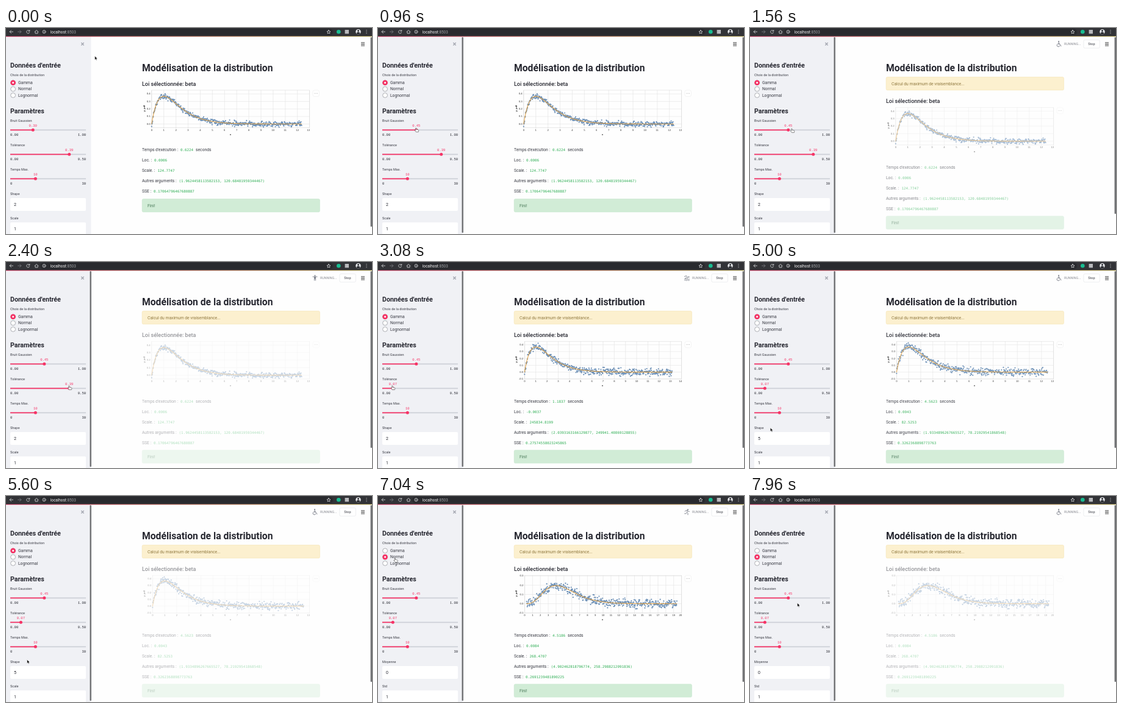
Write an HTML page that moves like this. It is 600x338 px and loops after 8 s.

```html
<!DOCTYPE html>
<html lang="fr">
<head>
<meta charset="utf-8">
<style>
html, body { margin: 0; width: 100%; height: 100%; overflow: hidden; background: #fff; }
svg { display: block; width: 100vw; height: 100vh; font-family: Roboto, Inter, sans-serif; fill: #262730; }
.mono { font-family: "Liberation Mono", "DejaVu Sans Mono", monospace; }
.code { font-family: "DejaVu Sans Mono", monospace; font-size: 5.83px; fill: #2fae55; }
.label { font-size: 5.5px; fill: #3a3c45; }
.body { font-size: 6.72px; fill: #363841; }
.h2 { font-size: 10.7px; font-weight: 700; }
.tick { font-size: 4.2px; font-family: "Liberation Sans", sans-serif; fill: #2b2b2b; }
.line { fill: none; stroke-linecap: round; stroke-linejoin: round; }
</style>
</head>
<body>
<svg viewBox="0 0 600 338" preserveAspectRatio="none">
  <defs>
    <linearGradient id="stripe"><stop stop-color="#f63366"/><stop offset="1" stop-color="#fbe87a"/></linearGradient>
  </defs>
  <rect width="600" height="338" fill="#fefefe"/>

  <g id="main">
    <text x="223" y="71.4" font-size="15.7" font-weight="700">Modélisation de la distribution</text>
    <g id="warning">
      <rect x="223.2" y="80.5" width="291.2" height="21.4" rx="2" fill="#fcf0cf" stroke="#f5e3b0" stroke-width=".6"/>
      <text x="232" y="93.6" font-size="6.75" fill="#8f783f">Calcul du maximum de vraisemblance...</text>
    </g>
    <g id="results">
      <text id="law" x="223" y="95.2" font-size="9" font-weight="500">Loi sélectionnée: beta</text>
      <g id="stale">
        <g id="charts"></g>
        <rect x="503" y="102" width="10.5" height="10.5" rx="3" fill="#fff" stroke="#ededed" stroke-width=".6"/>
        <path class="line" d="M506 107.3h0M508.2 107.3h0M510.4 107.3h0" stroke="#a5a5a5" stroke-width="1"/>
        <g id="lines"></g>
        <rect x="223.2" y="280.5" width="291.2" height="21.4" rx="2" fill="#d1ecd6" stroke="#c6e6cd" stroke-width=".6"/>
        <text x="232" y="293.6" font-size="6.7" fill="#4a7959">Fini!</text>
      </g>
    </g>
  </g>
  <rect id="scroll" x="597.6" y="15" width="2.4" rx="1" fill="#6f7073"/>

  <g id="status">
    <g id="poses" transform="translate(506.5 26)" stroke="#777b86" stroke-width=".9"></g>
    <text x="515" y="28" font-size="5.3" fill="#8b8d94">RUNNING...</text>
    <rect id="stopBox" x="547" y="19.5" width="26.3" height="13.5" rx="2" fill="#fff" stroke="#e6e7ea" stroke-width=".7"/>
    <text x="554.3" y="28.2" font-size="5.5" fill="#3a3c45">Stop</text>
  </g>
  <path d="M582 24h6M582 26.5h6M582 29h6" stroke="#333" stroke-width="1.1"/>

  <g id="sidebar">
    <rect y="14" width="139.5" height="324" fill="#f0f1f5"/>
    <path d="M123.3 24l4.4 4.4m0-4.4l-4.4 4.4" stroke="#a4a7b1" stroke-width="1.4"/>
    <text class="h2" x="7" y="65">Données d'entrée</text>
    <text class="label" x="7" y="79.2">Choix de la distribution</text>
    <g id="radios"></g>
    <text class="h2" x="7" y="139.5">Paramètres</text>
    <g id="sliders"></g>
    <g id="fields"></g>
    <rect id="sideScroll" x="137.5" y="15" width="2.4" height="321" rx="1" fill="#6f7073"/>
  </g>

  <g id="browser">
    <rect width="600" height="14" fill="#323337"/>
    <rect x="56" y="1" width="480" height="10.8" rx="5.4" fill="#292a2e"/>
    <g class="line" stroke="#c9cacc" stroke-width=".9">
      <path d="M11.5 6.2h-5.4m2.4-2.4L6.1 6.2l2.4 2.4"/>
      <path d="M19.5 6.2h5.4m-2.4-2.4l2.4 2.4-2.4 2.4" stroke="#77787c"/>
      <path d="M38.5 5a2.6 2.6 0 1 0 .1 2.4M38.8 3.4V5.2H37"/>
      <path d="M47 6.3L50 3.6l3 2.7M48 6v2.9h4V6"/>
      <circle cx="62.5" cy="6.2" r="2.6"/><path d="M62.5 6v1.4M62.5 4.8h0"/>
      <path d="M529 3.4l.9 1.9 2.1.3-1.5 1.4.4 2.1-1.9-1-1.9 1 .4-2.1-1.5-1.4 2.1-.3z"/>
      <path d="M591 3.7h0M591 6.2h0M591 8.7h0" stroke-width="1.2"/>
    </g>
    <text x="72.7" y="8.5" font-size="6.4" fill="#f1f1f2">localhost<tspan fill="#a0a2a6">:8503</tspan></text>
    <circle cx="545.3" cy="6.2" r="3.3" fill="#18bd91"/>
    <rect x="555.6" y="3" width="6.4" height="6.4" fill="#b9babd"/>
    <circle cx="577.5" cy="6.2" r="4.2" fill="#e6e7ea"/>
    <path d="M574.6 9.2q.4-2.8 2.9-2.8t2.9 2.8q-2.9 2.4-5.8 0z" fill="#2b2d33"/>
    <circle cx="577.5" cy="4.6" r="1.5" fill="#2b2d33"/>
    <rect y="13.6" width="600" height=".8" fill="url(#stripe)"/>
  </g>

  <g id="cursor">
    <path d="M0 0v6.2l1.5-1.3 1 2.2 1.1-.5-1-2.1h2z" fill="#111" stroke="#fff" stroke-width=".5"/>
    <path d="M-1.2-2.6q.7-.8 1.2 0v2l3 .6q1 .3.9 1.3l-.5 2.3H-.6L-2.6.9q0-1 1.4-.1z" fill="#fff" stroke="#444" stroke-width=".6"/>
    <path class="line" d="M-1.3-3.2h.8l.5.5.5-.5h.8M0-2.7v5.4M-1.3 3.2h.8l.5-.5.5.5h.8" stroke="#555" stroke-width=".5"/>
  </g>
</svg>
<script>
const LOOP = 8000, PINK = '#f63366', SHIFT = 28.2;
const $ = id => document.getElementById(id);
const clamp = v => Math.max(0, Math.min(1, v));
const ease = p => p * p * (3 - 2 * p);
const show = (el, on) => el.setAttribute('visibility', on ? 'inherit' : 'hidden');
const pick = (group, index) => [...group.children].forEach((el, i) => show(el, i === index));

// Piecewise eased path through [time, ...values] rows.
function track(rows, t) {
  const i = rows.findIndex(r => r[0] > t);
  if (i < 0) return rows.at(-1).slice(1);
  const a = rows[Math.max(0, i - 1)], b = rows[i];
  const p = ease(clamp((t - a[0]) / (b[0] - a[0] || 1)));
  return a.slice(1).map((v, k) => v + (b[k + 1] - v) * p);
}
const stepAt = (rows, t) => rows.filter(r => r[0] <= t).at(-1)[1];

function random(seed) {
  return () => {
    seed = (seed + 0x6D2B79F5) | 0;
    let z = Math.imul(seed ^ seed >>> 15, 1 | seed);
    z = z + Math.imul(z ^ z >>> 7, 61 | z) ^ z;
    return ((z ^ z >>> 14) >>> 0) / 4294967296;
  };
}

const fits = [
  { shape: 2, noise: .017, start: 0, end: 12.35, xMax: 13, yMin: -.05, yMax: .45, left: 238.8,
    values: ['0.6224', '0.0006', '124.7747', '(1.9624458113582153, 120.68481959344467)', '0.17064796467680887'] },
  { shape: 2, noise: .025, start: 0, end: 13.15, xMax: 14, yMin: -.1, yMax: .45, left: 240.3,
    values: ['1.1837', '-0.0037', '245834.8199', '(2.0393163166129877, 249941.40869128855)', '0.27574558023245865'] },
  { shape: 2, noise: .027, start: 0, end: 12.5, xMax: 13, yMin: -.1, yMax: .45, left: 240.3,
    values: ['4.5623', '0.0043', '82.5253', '(1.9334896267665527, 78.21929541868548)', '0.3262368898773763'] },
  { shape: 5, noise: .023, start: .25, end: 19.4, xMax: 20, yMin: -.1, yMax: .306, left: 240.5,
    values: ['4.5186', '0.0084', '268.4707', '(4.902462818796774, 258.2988212091836)', '0.2691239481890225'] }
];
const captions = ["Temps d'exécution :", 'Loc. :', 'Scale. :', 'Autres arguments :', 'SSE :'];

function chart(fit, index) {
  const top = 102, height = 61.7, right = 497.6, bottom = top + height;
  const X = x => fit.left + x / fit.xMax * (right - fit.left);
  const Y = y => bottom - (y - fit.yMin) / (fit.yMax - fit.yMin) * height;
  const pdf = x => x ** (fit.shape - 1) * Math.exp(-x) / (fit.shape === 2 ? 1 : 24);
  let grid = '', ticks = '', dots = '', curve = '';
  for (let x = 0; x <= fit.xMax; x++) {
    grid += `M${X(x)} ${top}V${bottom + 1.7}`;
    const dx = x === fit.xMax ? -1.8 : 0;
    ticks += `<text class="tick" x="${X(x) + dx}" y="169.2" text-anchor="middle">${x}</text>`;
  }
  for (let i = Math.ceil(fit.yMin * 10); i <= fit.yMax * 10; i++) {
    grid += `M${fit.left - 1.7} ${Y(i / 10)}H${right}`;
    ticks += `<text class="tick" x="${fit.left - 2.2}" y="${Y(i / 10) + 1.3}" text-anchor="end">${(i / 10).toFixed(1)}</text>`;
  }
  const rnd = random(41 + index), count = 480;
  for (let i = 0; i < count; i++) {
    const x = fit.start + (fit.end - fit.start) * i / (count - 1);
    const gauss = Math.sqrt(-2 * Math.log(1 - rnd())) * Math.cos(2 * Math.PI * rnd());
    const y = pdf(x) + fit.noise * Math.max(-2.5, Math.min(2.5, gauss));
    dots += `M${X(x).toFixed(2)} ${Y(Math.min(y, fit.yMax)).toFixed(2)}h0`;
    curve += `${i ? 'L' : 'M'}${X(x).toFixed(2)} ${Y(pdf(x)).toFixed(2)}`;
  }
  return `<g><path d="${grid}" stroke="#dcdcdc" stroke-width=".5"/>
    <rect x="${fit.left}" y="${top}" width="${right - fit.left}" height="${height}" fill="none" stroke="#d4d4d4" stroke-width=".5"/>
    ${ticks}
    <text class="tick" font-weight="700" x="368" y="176.3" text-anchor="middle">x</text>
    <text class="tick" font-weight="700" transform="translate(228.3 132) rotate(-90)" text-anchor="middle">y, pdf</text>
    <path class="line" d="${dots}" stroke="#4c78a8" stroke-opacity=".82" stroke-width="2.2"/>
    <path class="line" d="${curve}" stroke="#e09f42" stroke-opacity=".9" stroke-width="1.15"/></g>`;
}

const resultLines = fit => '<g>' + captions.map((caption, i) =>
  `<text class="body" x="223" y="${202.4 + 17 * i}">${caption} <tspan class="code" dx="2.3">${fit.values[i]}</tspan>` +
  (i ? '' : ' <tspan dx="2.3">seconds</tspan>') + '</text>').join('') + '</g>';

$('charts').innerHTML = fits.map(chart).join('');
$('lines').innerHTML = fits.map(resultLines).join('');

$('radios').innerHTML = ['Gamma', 'Normal', 'Lognormal'].map((name, i) => {
  const y = 89.8 + 10.3 * i;
  return `<circle cx="11.6" cy="${y}" r="3.9" fill="#fff" stroke="#a3a5ab" stroke-width=".9"/>
    <g class="on"><circle cx="11.6" cy="${y}" r="4.3" fill="${PINK}"/><circle cx="11.6" cy="${y}" r="1.5" fill="#fff"/></g>
    <text class="body" x="20" y="${y + 2.3}">${name}</text>`;
}).join('');
const radioMarks = document.querySelectorAll('.on');

function makeSlider([name, max, digits], i) {
  const y = 167.3 + 40 * i;
  const g = document.createElementNS('http://www.w3.org/2000/svg', 'g');
  g.innerHTML = `<text class="label" x="7" y="${y - 13.3}">${name}</text>
    <path d="M7 ${y}H131" stroke="#cdd0d7" stroke-width="1.7"/>
    <path class="fill" stroke="${PINK}" stroke-width="1.7"/>
    <circle class="knob" cy="${y}" r="2.5" fill="${PINK}"/>
    <text class="mono value" y="${y - 5.8}" font-size="5.5" fill="${PINK}" text-anchor="middle"/>
    <text class="mono" x="7" y="${y + 10.1}" font-size="5.5">${(0).toFixed(digits)}</text>
    <text class="mono" x="131" y="${y + 10.1}" font-size="5.5" text-anchor="end">${max.toFixed(digits)}</text>`;
  $('sliders').append(g);
  const [fill, knob, value] = ['.fill', '.knob', '.value'].map(s => g.querySelector(s));
  return v => {
    const x = 7 + 124 * v / max;
    fill.setAttribute('d', `M7 ${y}H${x}`);
    knob.setAttribute('cx', x);
    value.setAttribute('x', x);
    value.textContent = v.toFixed(digits);
  };
}
const [setNoise, setTolerance, setTime] =
  [['Bruit Gaussien', 1, 2], ['Tolérance', .5, 2], ['Temps Max.', 30, 0]].map(makeSlider);
setTime(10);

$('fields').innerHTML = [0, 40].map(dy =>
  `<text class="label name" x="7" y="${274 + dy}"/>
   <rect x="7" y="${279 + dy}" width="124" height="21" rx="2" fill="#fff"/>
   <text class="entry" x="13" y="${292.3 + dy}" font-size="7"/>`).join('');
const names = document.querySelectorAll('.name'), entries = document.querySelectorAll('.entry');

// Head position and limbs: runner, standing, swimmer, wheelchair.
$('poses').innerHTML = [
  [1.5, -3.7, 'M-3.4-.8l1.8-1.4H1L0 .8l1.5 1.6v2.4M-.3 1.4l-1.3 1.5h-2.3M1-2l1.3 1.4h1.5'],
  [0, -3.7, 'M-3.6-1.8h7.2M-1 4.2v-6M1 4.2v-6M0-1.6v3'],
  [2.9, -1.4, 'M-4-2.2l3-1.2L1.2-.2-3 .6M-4 2q1-1 2 0t2 0 2 0 2 0M-4 4q1-1 2 0t2 0 2 0 2 0'],
  [-.4, -3.8, 'M-.6-2.2V.8h2.4l1.6 3M1-.9H-.6M-2 0a2.5 2.5 0 1 0 3.4 3.2']
].map(([x, y, d]) => `<g><circle cx="${x}" cy="${y}" r=".6"/><path class="line" d="${d}"/></g>`).join('');

const runs = [
  { start: 980, end: 2600, pose: 0 },
  { start: 2920, end: 4100, pose: 1 },
  { start: 4750, end: 6200, pose: 2 },
  { start: 6900, end: 9000, pose: 0 }
];
const noiseTrack = [[0, .3], [700, .3], [950, .45]];
const toleranceTrack = [[0, .39], [2430, .39], [2880, .07]];
const cursorTrack = [
  [0, 145.5, 46], [120, 145.5, 46], [650, 44, 167], [700, 44, 167], [950, 62.8, 167], [1250, 69, 168],
  [1700, 69, 168], [2330, 104, 206], [2430, 104, 206], [2880, 24, 206], [3300, 24, 206], [3900, 26.5, 290.5],
  [4700, 26.5, 290.5], [5100, 34.5, 268.5], [5900, 34.5, 268.5], [6700, 28.5, 105], [7200, 28.5, 105], [7700, 77.5, 175.5]
];
const ARROW = 0, HAND = 1, BEAM = 2;
const cursorShapes = [[0, ARROW], [600, HAND], [1750, ARROW], [2280, HAND], [3350, ARROW],
  [3780, BEAM], [4880, ARROW], [6580, HAND], [7260, ARROW]];

function render(t) {
  const run = runs.find(r => t >= r.start && t < r.end);
  const latest = runs.filter(r => t >= r.start).at(-1);
  const done = runs.filter(r => t >= r.end).length;
  const statusOn = latest && t < latest.end + 250;
  const normal = t >= 6900;

  pick($('charts'), done);
  pick($('lines'), done);
  show($('warning'), run);
  $('results').setAttribute('transform', `translate(0 ${run ? SHIFT : 0})`);
  const fade = delay => run ? 1 - .63 * clamp((t - run.start - delay) / 600) : 1;
  $('stale').setAttribute('opacity', fade(180));
  $('law').setAttribute('opacity', Math.max(.48, fade(done ? 180 : 560)));
  $('scroll').setAttribute('height', run ? 290 : 311);

  show($('status'), statusOn);
  if (statusOn) {
    $('status').setAttribute('opacity', run ? 1 : .75);
    $('stopBox').setAttribute('stroke-opacity', run ? 1 : .3);
    pick($('poses'), (Math.floor((t - latest.start) / 150) + latest.pose) % 4);
  }

  setNoise(track(noiseTrack, t)[0]);
  setTolerance(track(toleranceTrack, t)[0]);
  radioMarks.forEach((el, i) => show(el, i === +normal));
  (normal ? ['Moyenne', 'Std'] : ['Shape', 'Scale']).forEach((s, i) => names[i].textContent = s);
  entries[0].textContent = normal ? 0 : t < 4500 ? 2 : 5;
  entries[1].textContent = 1;
  show($('sideScroll'), t > 250);

  const [x, y] = track(cursorTrack, t);
  $('cursor').setAttribute('transform', `translate(${x} ${y})`);
  pick($('cursor'), stepAt(cursorShapes, t));
}

const origin = performance.now();
function tick() {
  render((performance.now() - origin) % LOOP);
  requestAnimationFrame(tick);
}
tick();
</script>
</body>
</html>
```
